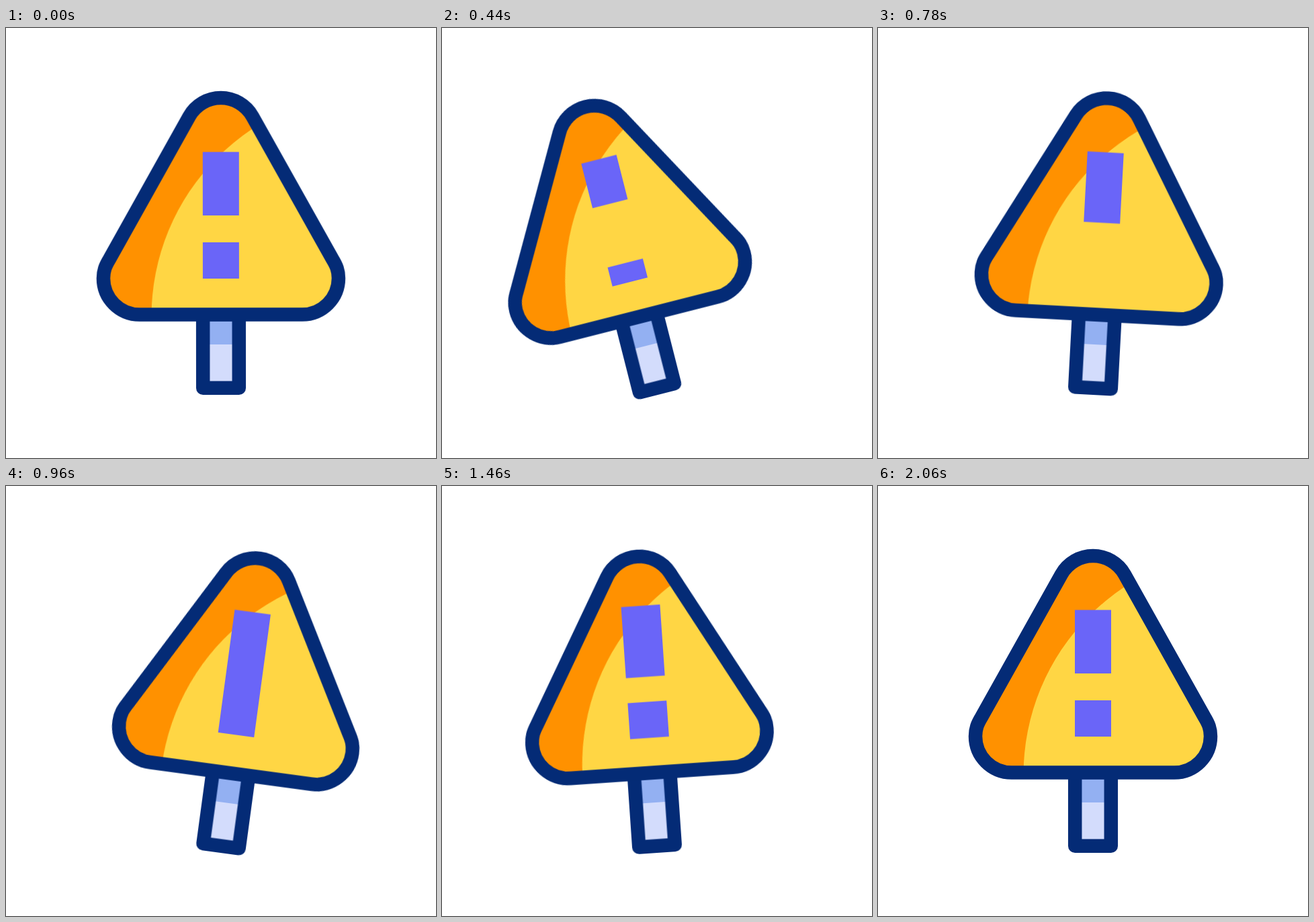
An HTML page for the animation above (3020 ms loop, 640 px wide and 640 px high).

```html
<!DOCTYPE html>
<html lang="en">
<head>
<meta charset="utf-8">
<title>Warning sign</title>
<style>
  html, body { margin: 0; width: 100%; height: 100%; overflow: hidden; background: #fff; }
  svg { display: block; width: 100vw; height: 100vh; }

  .sign, .bar, .dot {
    animation: 3020ms cubic-bezier(.333, 0, .667, 1) infinite;
  }
  .sign { transform-origin: 320px 536px; animation-name: swing; }
  .bar { animation-name: bar; }
  .dot { animation-name: dot; }
  .mark { fill: #6a65f8; }
  .edge { fill: none; stroke: #042b76; stroke-width: 20.5; stroke-linejoin: round; }

  /* Damped swing around the foot of the pole */
  @keyframes swing {
    0% { transform: rotate(0deg); animation-timing-function: cubic-bezier(.18, .2, .4, 1); }
    14.07% { transform: rotate(-14.3deg); animation-timing-function: cubic-bezier(.49, 0, .74, 1); }
    29.8% { transform: rotate(8.4deg); }
    45.03% { transform: rotate(-5.85deg); animation-timing-function: cubic-bezier(.46, 0, .667, 1); }
    54.3% { transform: rotate(2.8deg); }
    63.18% { transform: rotate(-.85deg); }
    68.21%, 100% { transform: rotate(0deg); }
  }

  /* The bar shortens, drops to full length, then springs back */
  @keyframes bar {
    0% { x: 293px; width: 54px; y: 184.5px; height: 94.5px; animation-timing-function: ease-in; }
    7.285% { x: 293px; width: 54px; y: 184.5px; height: 83.8px; animation-timing-function: ease-out; }
    21.2% { x: 293px; width: 54px; y: 184.5px; height: 62px; }
    33.1% { x: 293px; width: 54px; y: 184.5px; height: 188.5px; }
    48.3% { x: 291px; width: 58px; y: 177.5px; height: 106px; }
    57.9%, 100% { x: 293px; width: 54px; y: 184.5px; height: 94.5px; }
  }

  /* The dot rises to meet the bar, sinks away, and returns behind it */
  @keyframes dot {
    0% { x: 293px; width: 54px; y: 319px; height: 54px; }
    7.285% { x: 293px; width: 54px; y: 268.3px; height: 104.7px; }
    18.5% { x: 293px; width: 54px; y: 373px; height: 0; animation-timing-function: step-end; }
    33.1% { x: 293px; width: 54px; y: 319px; height: 54px; }
    48.3% { x: 291px; width: 58px; y: 320.8px; height: 53.7px; }
    57.9%, 100% { x: 293px; width: 54px; y: 319px; height: 54px; }
  }
</style>
</head>
<body>
<svg viewBox="0 0 640 640">
  <defs>
    <path id="plate" d="M273 131.5 A54 54 0 0 1 367 131.5 L486 344 C492 354 495 361 495 372.5 A54 54 0 0 1 441 426.5 H199 A54 54 0 0 1 145 372.5 C145 361 148 354 154 344 Z"/>
    <clipPath id="inside"><use href="#plate"/></clipPath>
  </defs>
  <g class="sign">
    <rect x="293" y="426" width="54" height="110" fill="#d3dcfc"/>
    <rect x="293" y="426" width="54" height="45" fill="#93b0f2"/>
    <rect class="edge" x="293.2" y="426" width="53.6" height="109.8"/>
    <use href="#plate" fill="#ff9100"/>
    <circle cx="552" cy="430" r="335.5" fill="#ffd644" clip-path="url(#inside)"/>
    <use href="#plate" class="edge"/>
    <rect class="mark bar" x="293" y="184.5" width="54" height="94.5"/>
    <rect class="mark dot" x="293" y="319" width="54" height="54"/>
  </g>
</svg>
</body>
</html>
```
